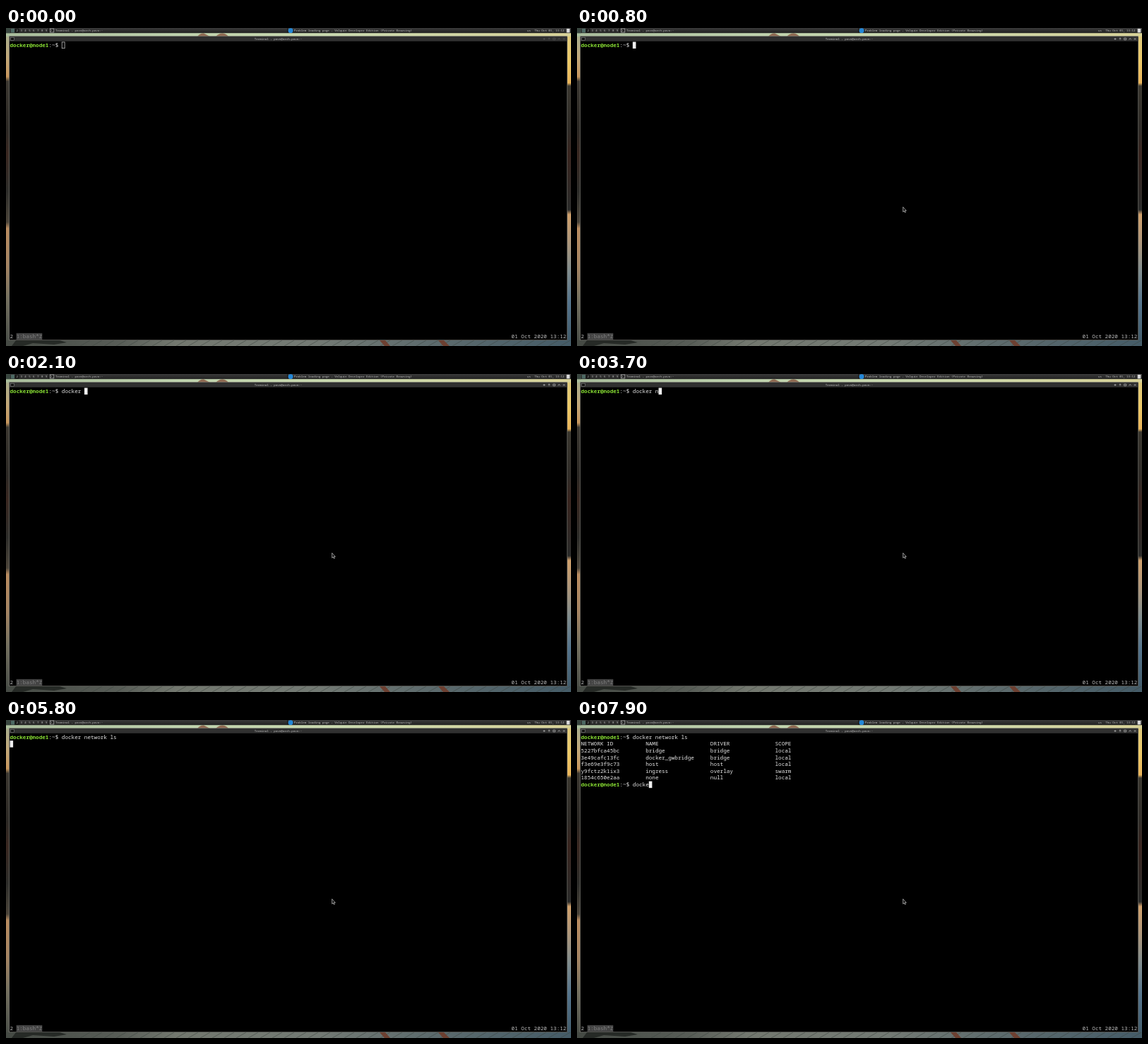
Animation, 800 px wide and 450 px high, one loop 8000 ms. Source, as an HTML page:

```html
<!DOCTYPE html>
<html lang="en">
<head>
<meta charset="utf-8">
<title>Terminal</title>
<style>
  html, body { margin: 0; width: 100%; height: 100%; overflow: hidden; background: #000; }
  svg { display: block; width: 100vw; height: 100vh; }
  text { font: 7.64px "Noto Sans Mono", "DejaVu Sans Mono", monospace; white-space: pre; fill: #e6e6e6; }
  .small { font-size: 4.17px; fill: #bcbcbc; }
  .user { font-weight: 700; fill: #8ae234; }
</style>
</head>
<body>
<svg viewBox="0 0 800 450">
  <defs>
    <linearGradient id="sky">
      <stop offset="0" stop-color="#a9bd9c"/><stop offset=".3" stop-color="#bfd3ae"/>
      <stop offset=".6" stop-color="#cbdab0"/><stop offset="1" stop-color="#d9d398"/>
    </linearGradient>
    <linearGradient id="left" x2="0" y2="1">
      <stop offset="0" stop-color="#a9ad8c"/><stop offset=".07" stop-color="#c3a878"/>
      <stop offset=".13" stop-color="#c8965c"/><stop offset=".145" stop-color="#3c3831"/>
      <stop offset=".3" stop-color="#2c2925"/><stop offset=".38" stop-color="#3a2821"/>
      <stop offset=".5" stop-color="#2d2d2a"/><stop offset=".6" stop-color="#4b4439"/>
      <stop offset=".62" stop-color="#b98b5f"/><stop offset=".74" stop-color="#a58462"/>
      <stop offset=".85" stop-color="#74705f"/><stop offset="1" stop-color="#454a45"/>
    </linearGradient>
    <linearGradient id="right" x2="0" y2="1">
      <stop offset="0" stop-color="#dfca7c"/><stop offset=".08" stop-color="#ecc968"/>
      <stop offset=".15" stop-color="#e9b45a"/><stop offset=".16" stop-color="#3b3830"/>
      <stop offset=".3" stop-color="#302d29"/><stop offset=".38" stop-color="#3a2620"/>
      <stop offset=".56" stop-color="#2b2c2b"/><stop offset=".575" stop-color="#cfa06c"/>
      <stop offset=".66" stop-color="#b0977a"/><stop offset=".76" stop-color="#7f8c8e"/>
      <stop offset=".86" stop-color="#55748c"/><stop offset="1" stop-color="#415a68"/>
    </linearGradient>
    <linearGradient id="deck">
      <stop offset="0" stop-color="#454a44"/><stop offset=".2" stop-color="#585d57"/>
      <stop offset=".3" stop-color="#73786f"/><stop offset=".55" stop-color="#737a74"/>
      <stop offset=".75" stop-color="#5d6b6d"/><stop offset="1" stop-color="#455c68"/>
    </linearGradient>
    <linearGradient id="panel" x2="0" y2="1">
      <stop offset="0" stop-color="#3a3a3a"/><stop offset="1" stop-color="#222"/>
    </linearGradient>
  </defs>

  <g id="wallpaper">
    <rect width="800" height="13" fill="url(#sky)"/>
    <path d="M271 12q4-5 9-4.500l9 4.500zM297 12q5-5 10-4.500t8 4.500z" fill="#8f6a52"/>
    <rect y="12" width="5" height="438" fill="url(#left)"/>
    <rect x="795" y="12" width="5" height="438" fill="url(#right)"/>
    <rect y="442" width="800" height="8" fill="url(#deck)"/>
    <path id="planks" fill="none" stroke="#3d4541" stroke-width="1" opacity=".55"/>
    <path d="M14 442h62l10 3-18 3-30-2-14 4H8z" fill="#262a26"/>
    <path d="M529 442h8l7 8h-8zM612 442h8l8 8h-9z" fill="#6d4031"/>
  </g>

  <g id="bar">
    <rect width="800" height="7.200" fill="url(#panel)"/>
    <rect width="6" height="7.200" fill="#39463f"/>
    <rect x="7" y="1" width="5" height="5.500" fill="#4d6963"/>
    <rect x="12.500" y=".5" width="6" height="6.500" fill="#161616"/>
    <path d="M60.500 0v7M398.500 0v7" stroke="#161616" stroke-width=".8"/>
    <rect x="62.300" y="1" width="5.500" height="5" fill="#222" stroke="#ccc" stroke-width=".6"/>
    <path d="M63.500 2.500l1.200 1-1.200 1" fill="none" stroke="#ddd" stroke-width=".5"/>
    <circle cx="403" cy="3.700" r="3.400" fill="#2387d8"/>
    <rect x="793.700" y="1" width="4.600" height="5.500" fill="#d9d9d9"/>
  </g>

  <g id="window">
    <rect x="4.600" y="11.700" width="790" height="430" fill="#000" stroke="#85857f" stroke-width=".6"/>
    <rect x="5" y="12" width="789.200" height="6.800" fill="#303030"/>
    <rect x="6.500" y="13.500" width="4.800" height="4" fill="#111" stroke="#999" stroke-width=".5"/>
    <path id="buttons" fill="none" stroke="#d0d0d0" stroke-width=".6"
      d="M760.500 15.500h3M762 14v3M767.700 15l1.300-1 1.300 1M769 14v3M774.700 14.200h2.800v2.600h-2.800zM781.700 16.500l1.500-2 1.500 2M788.800 14.200l2.600 2.600M791.400 14.200l-2.600 2.600"/>
    <rect x="14.600" y="431.800" width="36.700" height="9.200" fill="#444"/>
  </g>

  <g id="labels"></g>
  <g id="screen"></g>
  <rect id="cursor" stroke-width=".7"/>
  <path id="pointer" d="M0 0v7l1.600-1.300 1.100 2.300 1.100-.5-1.100-2.200h2z" fill="#111" stroke="#e4e4e4" stroke-width=".6"/>
</svg>

<script>
const LOOP = 8000, COL = 4.584, ROW = 9.58, LEFT = 5.5, BASE = 26.9;
const $ = id => document.getElementById(id);

function set(el, attrs) {
  for (const key in attrs) el.setAttribute(key, attrs[key]);
  return el;
}

function addText(parent, content, attrs) {
  const el = document.createElementNS("http://www.w3.org/2000/svg", "text");
  el.textContent = content;
  return $(parent).appendChild(set(el, attrs));
}

const label = (x, y, content, fill) => addText("labels", content, { x, y, style: `fill:${fill}` });
const small = (x, y, content, extra) => addText("labels", content, { x, y, class: "small", ...extra });
const line = (col, row, content, cls = "") =>
  addText("screen", content, { x: LEFT + col * COL, y: BASE + row * ROW, class: cls });

function prompt(row) {
  return [line(0, row, "docker@node1", "user"), line(12, row, ":~$"), line(16, row, "")];
}

// Panel, title bar and status line
const shell = "Terminal - pavo@arch-pavo:~";
for (let n = 2; n < 10; n++) small(8.6 + (n - 1) * 5.9, 5.1, n);
small(70, 5.1, shell);
small(407.8, 5.1, "Problem loading page - Velquin Developer Edition (Private Browsing)");
small(738, 5.1, "us");
small(748.2, 5.1, "Thu Oct 01, 13:12");
small(385.5, 17.1, shell, { "text-anchor": "middle" });
label(LEFT, 439, "2", "#bbb");
label(14.7, 439, "1:bash*Z", "#808080");
label(715.6, 439, "01 Oct 2020 13:12", "#bbb");

let planks = "";
for (let x = 110; x < 800; x += 17) planks += `M${x + 9} 442l-14 8`;
set($("planks"), { d: planks });

// Terminal contents
const first = prompt(0)[2];
const table = [
  "NETWORK ID|NAME|DRIVER|SCOPE",
  "5227bfca45bc|bridge|bridge|local",
  "3e49cafc13fc|docker_gwbridge|bridge|local",
  "f3e69e3f9c73|host|host|local",
  "y9fctz2k1ix3|ingress|overlay|swarm",
  "1854c650e2aa|none|null|local"
];
const output = table.flatMap((row, r) => row.split("|").map((cell, c) => line(c * 20, r + 1, cell)));
const next = prompt(7);
output.push(...next);

const typed1 = [
  [0, ""], [1500, "d"], [1600, "doc"], [1800, "docke"], [2000, "docker"], [2100, "docker "],
  [3700, "docker n"], [4000, "docker "], [4200, "docker ne"], [4400, "docker net"],
  [4800, "docker netwo"], [4900, "docker network "], [5400, "docker network l"], [5500, "docker network ls"]
];
const typed2 = [
  [0, ""], [6900, "d"], [7100, "doc"], [7200, "dock"], [7500, "docke"], [7800, "dock"], [7900, "docke"]
];
const ENTER = 5700, PRINT = 5900, FOCUS = 300;

const at = (steps, t) => steps.filter(s => s[0] <= t).pop()[1];

function drawCursor(col, row, active) {
  const inset = active ? 0 : 0.35;
  set($("cursor"), {
    x: LEFT + col * COL + inset,
    y: 19.6 + row * ROW + inset,
    width: 4.6 - 2 * inset,
    height: 9.5 - 2 * inset,
    fill: active ? "#f0f0f0" : "none",
    stroke: active ? "none" : "#d8d8d8"
  });
}

function draw(t) {
  const a = at(typed1, t), b = at(typed2, t), active = t >= FOCUS;
  first.textContent = a;
  next[2].textContent = b;
  for (const el of output) el.style.display = t < PRINT ? "none" : "";

  if (t >= PRINT) drawCursor(16 + b.length, 7, active);
  else if (t >= ENTER) drawCursor(0, 1, active);
  else drawCursor(16 + a.length, 0, active);
  set($("buttons"), { opacity: active ? 1 : 0.25 });

  // The pointer glides in from the right edge
  const p = Math.min(1, Math.max(0, (Math.floor(t / 100) * 100 - 100) / 600));
  const ease = 1 - (1 - p) ** 3;
  set($("pointer"), { transform: `translate(${802 - 340.4 * ease} ${232 + 21.2 * ease})` });
}

const start = performance.now();
function tick() {
  draw((performance.now() - start) % LOOP);
  requestAnimationFrame(tick);
}
tick();
</script>
</body>
</html>
```
